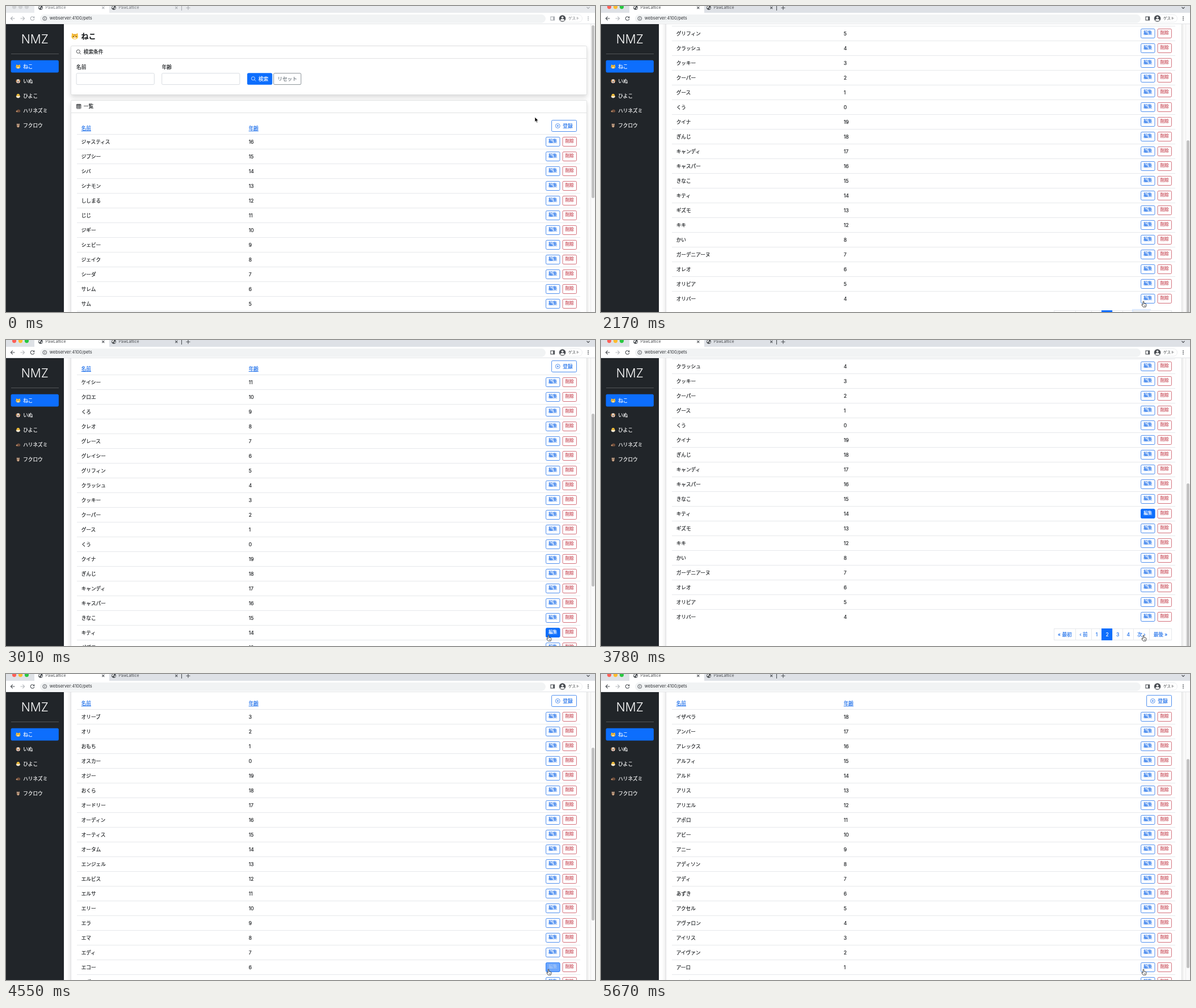
Write an HTML page that moves like this. It is 1038 px wide and 540 px high and loops after 5.95 s.

```html
<!DOCTYPE html>
<html lang="ja">
<head>
<meta charset="utf-8">
<title>Pets</title>
<style>
html, body { margin: 0; width: 100%; height: 100%; overflow: hidden; background: #fff; }
body { font: 8.65px/20px Inter, "Noto Sans CJK JP", "Noto Sans CJK", sans-serif; color: #1b1e21; -webkit-text-stroke: .18px; }
#stage { position: absolute; left: 0; top: 0; width: 1038px; height: 540px; overflow: hidden; }
#stage div, #stage svg { position: absolute; box-sizing: border-box; }
svg { left: 0; top: 0; overflow: visible; }
.t { white-space: nowrap; height: 20px; }
.c { display: flex; align-items: center; justify-content: center; white-space: nowrap; }
.card { background: #fff; border: 1px solid #e0e1e2; border-radius: 2.5px; box-shadow: 0 4.3px 8.7px rgba(0,0,0,.15); }
.line { height: 1px; background: #e6e8eb; }
.cap { height: 1px; background: #e0e1e2; }
.sm { font-size: 7.6px; }
.blue { color: #1f70ea; }
.red { color: #c84a57; }
.grey { color: #6c757d; }
.input { color: #ced4da; }
.fill { color: #0d6efd; }
.white { color: #fff; }
.frame { fill: none; stroke: currentColor; stroke-width: .8; }
.fill .frame { fill: currentColor; }
.link { color: #1f70ea; text-decoration: underline; text-decoration-thickness: .6px; }
.h { font-size: 13px; font-weight: 700; }
.page { left: 0; top: 0; display: none; }
.pager { display: flex; justify-content: flex-end; }
#stage .pager .p { position: relative; height: 21px; margin-left: -1px; border: 1px solid #e6e8eb; color: #1f70ea; background: #fff; }
#stage .pager .on { background: #0d6efd; color: #fff; border-color: #0d6efd; }
.glow { inset: 0; background: #e9ecef; }
.ring { inset: -1px; box-shadow: 0 0 0 2.2px rgba(13,110,253,.25); }
.pager span { position: relative; }
#view { left: 102px; top: 32px; width: 928px; height: 508px; overflow: hidden; background: #fff; }
#side { left: 0; top: 32px; width: 101.5px; height: 508px; background: #212529; }
.rule { background: rgba(255,255,255,.22); }
.brand { font-size: 21px; font-weight: 300; color: #fff; -webkit-text-stroke: 0; }
#track { left: 1029.5px; top: 32px; width: 9px; height: 508px; background: #fafafa; border-left: 1px solid #ebebeb; }
#thumb { left: 1032px; width: 4.5px; border-radius: 3px; background: #c1c1c1; }
#bar { left: 0; top: 0; width: 1038px; height: 32px; background: #fff; border-bottom: 1px solid #e1e3e6; -webkit-text-stroke: 0; --ink: #4b4f54; --tab: #dee1e6; }
#bar.idle { --ink: #a9adb2; --tab: #e9ebee; }
#bar.idle .light { fill: #d0d2d5; }
.strip { background: var(--tab); }
.active { background: #fff; }
.omni { background: #f1f3f4; border-radius: 8px; }
.user { border: 1px solid #eceef0; border-radius: 7px; }
.tab { font-size: 6.9px; color: #4a4d51; }
.url { font-size: 7.5px; color: #303337; }
.guest { font-size: 6.5px; color: #3c4043; }
#bar.idle .tab, #bar.idle .guest { color: #74787d; }
.ink { stroke: var(--ink); fill: none; stroke-width: 1.1; }
</style>
</head>
<body>
<div id="stage"></div>
<script>
const LOOP = 5950, STEP = 70, ROW = 26, PER = 25, VIEW = 526;
const NAMES = `ジャスティス ジプシー シバ シナモン ししまる じじ ジギー シェビー ジェイク シーダ サレム サム サミー
サディ サシー さくら サーシャ ゴンゾ コナ こてつ こたろう コスモ ここ ケティ ケイティ
ケイシー クロエ くろ クレオ グレース グレイシー グリフィン クラッシュ クッキー クーパー グース くう クイナ
ぎんじ キャンディ キャスパー きなこ キティ ギズモ キキ かい ガーデニアーヌ オレオ オリビア オリバー
オリーブ オリ おもち オスカー オジー おくら オードリー オーディン オーティス オータム エンジェル エルビス エルサ
エリー エラ エマ エディ エコー エヴァ エイヴァ うに ウィロー ウィリアム ウィスカー イジィ
イザベラ アンバー アレックス アルフィ アルド アリス アリエル アポロ アビー アニー アディソン アディ あずき
アクセル アヴァロン アイリス アイヴァン アーロ アーチー`.split(/\s+/);

// ages count down through 0..19, with a gap of three after row 44
const ageOf = i => (116 - i - (i > 44 ? 3 : 0)) % 20;

const box = (x, y, w, h, cls, html = '') =>
  `<div class="${cls}" style="left:${x}px;top:${y}px;width:${w}px;height:${h}px">${html}</div>`;
const text = (x, cy, s, cls = '') => `<div class="t ${cls}" style="left:${x}px;top:${cy - 10}px">${s}</div>`;
const art = (body, cls = '') => `<svg class="${cls}" width="1" height="1">${body}</svg>`;
const icon = (x, y, size, view, body, cls = '') =>
  art(`<svg x="${x}" y="${y}" width="${size}" height="${size}" viewBox="0 0 ${view} ${view}">${body}</svg>`, cls);
const frame = (x, y, w, h, cls) =>
  art(`<rect class="frame" x="${x + .4}" y="${y + .4}" width="${w - .8}" height="${h - .8}" rx="1.9"/>`, cls);
const button = (x, y, w, h, cls, label) =>
  frame(x, y, w, h, cls) + box(x, y, w, h, 'c ' + cls.replace('fill', 'white'), label);
const line = (x, y, w, cls = 'line') => box(x, y, w, 1, cls);
const dot = (x, y, r, fill) => `<circle cx="${x}" cy="${y}" r="${r}" fill="${fill}"/>`;

const stroked = d => `<g fill="none" stroke="currentColor" stroke-width="1.4">${d}</g>`;
const LENS = stroked('<circle cx="6.5" cy="6.5" r="5.6"/><path d="M10.7 10.7l4.6 4.6"/>');
const GRID = stroked('<rect x="1" y="1" width="14" height="14" rx="1.5"/><path d="M1 3h14M1 6h14M1 10.3h14M5.6 3v12M10.4 3v12"/>');
const PLUS = stroked('<circle cx="8" cy="8" r="7.2"/><path d="M8 4.5v7M4.5 8h7"/>');

const ANIMALS = {
  cat: '<path d="M2 1l6 4h4l6-4 1 11H1z" fill="#f5b32d"/><ellipse cx="10" cy="11.5" rx="9.3" ry="7.7" fill="#fbc63f"/>' +
    '<path d="M10 4v4M7 5l1 3M13 5l-1 3" stroke="#b36b1c"/><ellipse cx="10" cy="15" rx="4" ry="3" fill="#fff3d6"/>' +
    dot(6, 11, 1.5, '#4a3320') + dot(14, 11, 1.5, '#4a3320') + dot(10, 13.5, 1.2, '#e0797a'),
  dog: '<ellipse cx="10" cy="10" rx="8" ry="8.6" fill="#f3e6d6"/><path d="M4 3Q-1 6 1 14q4 0 4-8zM16 3q5 3 3 11-4 0-4-8z" fill="#bd7a42"/>' +
    dot(7, 9, 1.4, '#33261e') + dot(13, 9, 1.4, '#33261e') + dot(10, 13, 2, '#33261e') + '<path d="M8.5 15.5h3v3h-3z" fill="#e8696d"/>',
  chick: dot(10, 7.5, 6.5, '#fccb3d') + '<path d="M1 11l3-2 3 3 3-3 3 3 3-3 3 2q-1 8-9 8t-9-8z" fill="#f3ead9"/>' +
    '<path d="M1 9l4 3-2 1zM19 9l-4 3 2 1z" fill="#f6b52a"/>' + dot(7, 6.5, 1, '#3a2a1a') + dot(13, 6.5, 1, '#3a2a1a') + dot(10, 8.5, 1.5, '#ef7f25'),
  hedgehog: '<path d="M0 13q3-3 5-5 5-5 11-2 5 3 3 9-3 3-11 2-6 0-8-4z" fill="#6f4d3b"/><path d="M0 13q3-4 6-4 3 4 1 7-5 0-7-3z" fill="#c99873"/>' +
    dot(4.5, 11.5, .9, '#221814') + dot(.8, 13, 1, '#221814'),
  owl: '<path d="M4 1l3 2h6l3-2q2 9 0 14-2 4-6 4t-6-4Q2 10 4 1z" fill="#83604c"/><ellipse cx="10" cy="14" rx="4" ry="4.5" fill="#c9a88c"/>' +
    dot(7.2, 6.5, 2.6, '#f0dfc8') + dot(12.8, 6.5, 2.6, '#f0dfc8') + dot(7.2, 6.5, 1.2, '#2a1c14') + dot(12.8, 6.5, 1.2, '#2a1c14') +
    '<path d="M9 8h2l-1 3z" fill="#eda534"/>'
};

function pager(n, y) {
  const item = (w, s, cls = '') => `<div class="p c ${cls}" style="width:${w}px">${s}</div>`;
  let s = n > 1 ? item(39.5, '« 最初') + item(28.5, '‹ 前') : '';
  for (let i = 1; i < 5; i++) s += item(19.6, i, i === n ? 'on' : '');
  if (n < 4) s += item(29, '<div class="glow"></div><div class="ring"></div><span>次 ›</span>') + item(40, '最後 »');
  return box(706, y, 300, 21, 'pager', s);
}

function page(n) {
  const first = (n - 1) * PER, list = NAMES.slice(first, first + PER);
  const cut = (PER - list.length) * ROW;
  const edit = (y, cls) => button(951.2, y + 5, 25.2, 16.9, 'sm ' + cls, '編集');
  let s = box(114, 166, 910, 758 - cut, 'card') + line(115, 188, 908, 'cap') +
    icon(123.8, 172.8, 8.7, 16, GRID) + text(136.8, 177, '一覧') +
    text(132.7, 215.5, '名前', 'link') + text(427.7, 215.5, '年齢', 'link') +
    frame(961.2, 201.2, 44.7, 20.7, 'blue') + icon(968, 207.2, 8.7, 16, PLUS, 'blue') +
    text(981.3, 211.5, '登録', 'blue');
  list.forEach((name, i) => {
    const y = 226 + i * ROW;
    s += line(125, y, 887) + text(132.7, y + 13.5, name) + text(427.7, y + 13.5, ageOf(first + i)) +
      edit(y, 'blue') + button(980.6, y + 5, 25.2, 16.9, 'sm red', '削除');
  });
  if (n === 2 || n === 3) s += box(0, 0, 0, 0, 'hot', edit(226 + 17 * ROW, 'fill'));
  return `<div class="page">${s}${pager(n, 884 - cut)}</div>`;
}

const search =
  icon(115, 47, 12.5, 20, ANIMALS.cat) + text(132.5, 53, 'ねこ', 'h') +
  box(114, 70, 910, 87, 'card') + line(115, 92, 908, 'cap') +
  icon(123.8, 76.8, 8.7, 16, LENS) + text(136.8, 81, '検索条件') +
  text(124, 107.5, '名前') + text(274.7, 107.5, '年齢') +
  frame(123.7, 118.3, 138, 20.7, 'input') + frame(274.3, 118.3, 138, 20.7, 'input') +
  frame(425, 118.3, 44.3, 20.7, 'fill') + icon(432, 124.3, 8.7, 16, LENS, 'white') +
  text(445, 128.5, '検索', 'white') + button(471.3, 118.3, 49, 20.7, 'grey', 'リセット');

const MENU = [['cat', 'ねこ'], ['dog', 'いぬ'], ['chick', 'ひよこ'], ['hedgehog', 'ハリネズミ'], ['owl', 'フクロウ']];
const side = '<div id="side"></div>' +
  box(0, 44, 101.5, 30, 'c brand', 'NMZ') + line(8.5, 84, 84.5, 'rule') +
  frame(8.6, 95.7, 84.3, 21.8, 'fill') +
  MENU.map(([k, s], i) => icon(17.3, 102.6 + i * ROW, 8.2, 20, ANIMALS[k]) + text(30.2, 106.5 + i * ROW, s, 'white')).join('');

const globe = x => icon(x - 4, -1, 8, 16, dot(8, 8, 7.6, '#44484d') +
  '<path d="M3 4l5-2 1 3-3 2 1 3-2 1-3-4zM10 8l4-1-1 5-3 1z" fill="#fff"/>');
const cross = x => `<path d="M${x - 2} 1.2l4 4m0-4l-4 4"/>`;
const light = (x, fill) => `<circle class="light" cx="${x}" cy="1.6" r="3.6" fill="${fill}"/>`;
const bar = '<div id="bar">' +
  box(0, 0, 1038, 12, 'strip') + box(50, 0, 132, 13, 'active') +
  globe(61) + text(69.7, 3.2, 'PawLattice', 'tab') + globe(190) + text(198.7, 3.2, 'PawLattice', 'tab') +
  box(60, 14.5, 891, 15, 'omni') + text(76.8, 22, 'webserver:4100/pets', 'url') +
  box(973, 15, 43, 14, 'user') + text(991, 22, 'ゲスト', 'guest') +
  art(light(14.5, '#fe5f57') + light(25.5, '#febc2e') + light(36.5, '#28c840') +
    `<g class="ink">${cross(171.3)}${cross(300.3)}
      <path d="M317.5 3.2h7m-3.5-3.5v7M309.5 0v8M1023.5 2l2.5 2.5 2.5-2.5"/>
      <path d="M15.5 22h-7m3.2-3.3L8.4 22l3.3 3.3"/>
      <path d="M25.5 22h7m-3.2-3.3l3.3 3.3-3.3 3.3" style="stroke:#b4b7bb"/>
      <path d="M49.2 20a3.3 3.3 0 1 0 .6 2.6M49.8 18.4v2.4h-2.4"/>
      <rect x="960" y="19" width="6.6" height="6"/><path d="M965.4 19v6" stroke-width="2.4"/>
    </g>
    <g fill="none" stroke="#4b4f54"><circle cx="68.3" cy="22" r="3.4" stroke-width=".9"/><path d="M68.3 21.5v2.3M68.3 19.7v1"/></g>
    <path d="M977 25.4q0-2.6 3.6-2.6t3.6 2.6q-3.6 2-7.2 0z" fill="#fff"/>
    ${dot(980.6, 22, 5.8, '#484c51')}${dot(980.6, 20.2, 1.8, '#fff')}
    <path d="M977 25.4q0-2.6 3.6-2.6t3.6 2.6q-3.6 2-7.2 0z" fill="#fff"/>
    ${[19.2, 22, 24.8].map(y => dot(1026, y, .9, 'var(--ink)')).join('')}`) + '</div>';

const cursors = `<svg id="arrow" width="8" height="12"><path d="M0 0v8.6l2-1.8 1.4 3.2 1.5-.7-1.4-3h2.7z" fill="#000" stroke="#fff" stroke-width=".7"/></svg>
  <svg id="hand" width="9" height="11"><path d="M-.9 1q0-1 .9-1t.9 1v3l3.2.7q1.1.3 1 1.5l-.5 2.5-.6 1.5H-.6L-3 6.8q-.6-1.2.5-1.4l1.6 1.2z" fill="#fff" stroke="#222" stroke-width=".8"/><path d="M1.5 7v2M3 7v2" stroke="#222" stroke-width=".5"/></svg>`;

document.getElementById('stage').innerHTML =
  `<div id="view"><div id="doc">${search}${[1, 2, 3, 4].map(page).join('')}</div></div>` +
  side + '<div id="track"></div><div id="thumb"></div>' + bar + cursors;

// start, end, from, to
const SCROLL = [
  [320, 910, 0, 375], [2115, 2357, 375, 164], [3005, 3150, 164, 375],
  [4069, 4311, 375, 164], [4755, 4900, 164, 375], [5530, 5653, 219, 164]
];
const SWITCH = [2100, 4060, 5530];
const PATH = [[0, 932, 196], [910, 932, 196], [1050, 962, 508], [1190, 962, 508], [1260, 962, 529], [1330, 962, 529], [1680, 955.5, 520.5], [LOOP, 955.5, 520.5]];
const HOT = [[2500, 3780], [4460, 5250]];
const NEXT = [[1400, 2500], [3780, 4460], [5250, LOOP]];
const RING = [[1820, 2100], [3780, 4060], [5250, 5530]];

const $ = id => document.getElementById(id);
const css = (id, rules) => Object.assign($(id).style, rules);
const pages = [...document.querySelectorAll('.page')];
const setAll = (sel, o) => document.querySelectorAll(sel).forEach(e => e.style.opacity = o);
const clamp = x => Math.min(1, Math.max(0, x));
const smooth = x => x * x * (3 - 2 * x);
// 150 ms fade in and out around each span
const fade = (spans, t) => Math.max(...spans.map(([a, b]) => clamp((t - a) / 150) - clamp((t - b) / 150)));

function scrollAt(t) {
  const s = SCROLL.filter(k => t >= k[0]).pop();
  return s ? Math.round(s[2] + (s[3] - s[2]) * smooth(clamp((t - s[0]) / (s[1] - s[0])))) : 0;
}

function pointAt(t) {
  const i = PATH.findIndex(k => k[0] > t), [a, ax, ay] = PATH[i - 1], [b, bx, by] = PATH[i];
  const k = (t - a) / (b - a);
  return [ax + (bx - ax) * k, ay + (by - ay) * k];
}

function draw(t) {
  const n = SWITCH.filter(s => t >= s).length;
  const y = scrollAt(t), ratio = VIEW / (n === 3 ? 745 : 901);
  pages.forEach((p, i) => p.style.display = i === n ? 'block' : 'none');
  css('doc', { transform: `translate(-102px, ${-32 - y}px)` });
  css('thumb', { top: 34 + y * ratio + 'px', height: VIEW * ratio - 2 + 'px' });
  setAll('.hot', fade(HOT, t));
  setAll('.glow', fade(NEXT, t));
  setAll('.ring', fade(RING, t));
  const [cx, cy] = pointAt(t), hand = t >= 1400;
  css('arrow', { left: cx + 'px', top: cy + 'px', display: hand ? 'none' : 'block' });
  css('hand', { left: cx + 'px', top: cy + 'px', display: hand ? 'block' : 'none' });
  $('bar').className = t < STEP ? 'idle' : '';
}

let start;
function tick(now) {
  start ??= now;
  const t = (now - start) % LOOP;
  draw(Math.floor(t / STEP) * STEP);
  requestAnimationFrame(tick);
}
draw(0);
requestAnimationFrame(tick);
</script>
</body>
</html>
```
